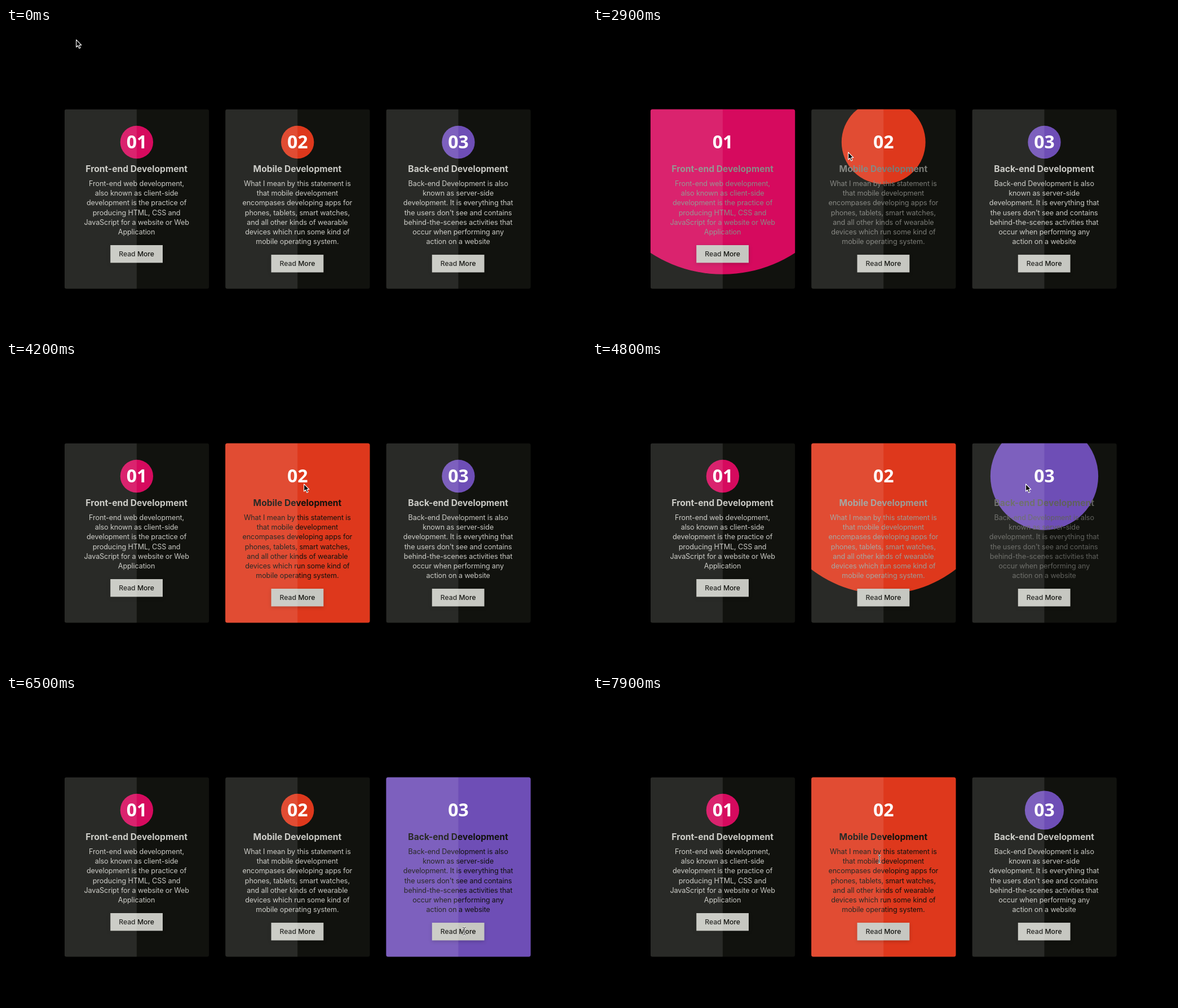
Write an HTML page that moves like this. It is 1029 px wide and 544 px high and loops after 8000 ms.

```html
<!DOCTYPE html>
<html lang="en">
<head>
<meta charset="utf-8">
<title>Service cards</title>
<style>
  html, body { margin: 0; width: 100%; height: 100%; overflow: hidden; background: #000; }
  svg { display: block; width: 1029px; height: 544px; }
  text { font-family: Inter, "Open Sans", sans-serif; text-anchor: middle; }
  .num { font: 700 32px "Open Sans", sans-serif; fill: #fff; }
  .title { font-size: 15.6px; font-weight: 700; }
  .body { font-size: 12.6px; letter-spacing: -.11px; }
  .label { font-size: 12.2px; font-weight: 500; fill: #11120e; }
  .button { fill: #c6c7c1; filter: drop-shadow(0 2px 3px rgba(0, 0, 0, .2)); }
</style>
</head>
<body>
<svg id="stage" viewBox="0 0 1029 544">
  <defs>
    <clipPath id="card"><rect width="256.4" height="319.2" rx="3.5"/></clipPath>
  </defs>
</svg>
<script>
const LOOP = 8000, STEP = 100, GROW = 965, FADE = 500;
const R0 = 29.2, R1 = 321;
const LIGHT = [200, 200, 195], DARK = [17, 18, 14];

// on: spans of time during which the pointer is over the card
const cards = [
  { x: 103.8, color: '#d60a5e', title: 'Front-end Development', on: [[1320, 2707]],
    lines: ['Front-end web development,', 'also known as client-side',
      'development is the practice of', 'producing HTML, CSS and',
      'JavaScript for a website or Web', 'Application'] },
  { x: 389.1, color: '#de381c', title: 'Mobile Development', on: [[2770, 4570], [7190, 9000]],
    lines: ['What I mean by this statement is', 'that mobile development',
      'encompases developing apps for', 'phones, tablets, smart watches,',
      'and all other kinds of wearable', 'devices which run some kind of',
      'mobile operating system.'] },
  { x: 674.4, color: '#6e4eb6', title: 'Back-end Development', on: [[4636, 7105]],
    lines: ['Back-end Development is also', 'known as server-side',
      'development. It is everything that', "the users don't see and contains",
      'behind-the-scenes activities that', 'occur when performing any',
      'action on a website'] }
];

// Pointer path: time, x, y, shape (a arrow, i text beam, - hidden)
const path = [
  [0, 124, 20, 'a'], [100, 124, 20, 'a'], [300, 86, 2, 'a'], [400, 86, 2, '-'],
  [600, 140, 18, 'a'], [700, 140, 18, 'a'], [1300, 173, 138, 'a'], [1500, 191, 187, 'a'],
  [1600, 207, 262, 'i'], [2000, 222, 312, 'i'], [2300, 222, 312, 'i'], [2600, 318, 262, 'a'],
  [2900, 454, 220, 'a'], [3200, 503, 218, 'i'], [3300, 505, 218, 'i'], [4100, 505, 218, 'i'],
  [4200, 528, 216, 'a'], [4300, 553, 213, 'a'], [4400, 553, 213, 'a'], [4640, 677, 212, 'a'],
  [4800, 769, 216, 'a'], [5200, 820, 290, 'i'], [5400, 821, 310, 'i'], [5600, 775, 379, 'i'],
  [5700, 775, 379, 'i'], [5800, 829, 405, 'i'], [5900, 810, 419, 'i'], [6000, 810, 419, 'i'],
  [6200, 837, 420, 'a'], [6300, 837, 420, 'a'], [6500, 813, 418, 'i'], [6700, 775, 286, 'i'],
  [6800, 775, 286, 'i'], [7100, 675, 289, 'a'], [7190, 645, 290, 'a'], [7300, 595, 290, 'i'],
  [7600, 525, 290, 'i'], [7900, 510, 290, 'i']
];

const stage = document.getElementById('stage');

function add(parent, tag, attrs, text) {
  const el = document.createElementNS('http://www.w3.org/2000/svg', tag);
  for (const key in attrs) el.setAttribute(key, attrs[key]);
  if (text) el.textContent = text;
  parent.appendChild(el);
  return el;
}

function build(card, i) {
  const g = add(stage, 'g', { transform: `translate(${card.x} 144.4)`, 'clip-path': 'url(#card)' });
  add(g, 'rect', { width: 257, height: 320, fill: '#11120e' });
  card.circle = add(g, 'circle', { cx: 128.1, cy: 58.6, fill: card.color });
  add(g, 'text', { class: 'num', x: 128.1, y: 69.7 }, '0' + (i + 1));
  card.copy = add(g, 'g', {});
  add(card.copy, 'text', { class: 'title', x: 127.8, y: 112 }, card.title);
  card.lines.forEach((line, n) =>
    add(card.copy, 'text', { class: 'body', x: 127.8, y: 137 + n * 17.05 }, line));
  const top = 139.3 + card.lines.length * 17.05;
  add(g, 'rect', { class: 'button', x: 81.4, y: top, width: 92.8, height: 31.4 });
  add(g, 'text', { class: 'label', x: 127.8, y: top + 20 }, 'Read More');
  add(g, 'rect', { width: 128.1, height: 320, fill: '#fff', 'fill-opacity': .1 });
}
cards.forEach(build);

const arrow = add(stage, 'path', {
  d: 'M.6 .8V14L3.6 11.2 5.8 16.2 8 15.2 5.9 10.4H9.8Z',
  fill: '#000', stroke: '#fff', 'stroke-width': 1.1, 'stroke-linejoin': 'round'
});
const beam = add(stage, 'g', { fill: 'none' });
const beamPath = 'M-2.5 -6.5H-1L0 -5.5 1 -6.5H2.5M0 -5.5V5.5M-2.5 6.5H-1L0 5.5 1 6.5H2.5';
add(beam, 'path', { d: beamPath, stroke: '#fff', 'stroke-width': 2.6 });
add(beam, 'path', { d: beamPath, stroke: '#000', 'stroke-width': 1 });

// cubic-bezier(.25, .1, .25, 1)
function ease(p) {
  if (p <= 0) return 0;
  if (p >= 1) return 1;
  const curve = (a, b, s) => 3 * a * s * (1 - s) ** 2 + 3 * b * s * s * (1 - s) + s ** 3;
  let lo = 0, hi = 1;
  for (let i = 0; i < 24; i++) {
    const mid = (lo + hi) / 2;
    if (curve(.25, .25, mid) < p) lo = mid; else hi = mid;
  }
  return curve(.1, 1, lo);
}

const mix = (a, b, p) => a + (b - a) * p;

const hover = (card, t, span) => card.on.reduce(
  (sum, [start, end]) => sum + ease((t - start) / span) - ease((t - end) / span), 0);

function movePointer(t) {
  let i = path.length - 1;
  while (path[i][0] > t) i--;
  const a = path[i], b = path[i + 1] || a;
  const p = b === a ? 0 : (t - a[0]) / (b[0] - a[0]);
  const place = `translate(${mix(a[1], b[1], p)} ${mix(a[2], b[2], p)})`;
  [[arrow, 'a'], [beam, 'i']].forEach(([el, shape]) => {
    el.setAttribute('transform', place);
    el.setAttribute('visibility', a[3] === shape ? 'visible' : 'hidden');
  });
}

function draw(t) {
  for (const card of cards) {
    const fade = hover(card, t, FADE);
    card.circle.setAttribute('r', mix(R0, R1, hover(card, t, GROW)));
    card.copy.setAttribute('fill', `rgb(${LIGHT.map((c, k) => Math.round(mix(c, DARK[k], fade)))})`);
  }
  movePointer(t);
}

const begin = performance.now();
function tick() {
  const t = (performance.now() - begin) % LOOP;
  draw(Math.floor(t / STEP) * STEP);
  requestAnimationFrame(tick);
}
tick();
</script>
</body>
</html>
```
